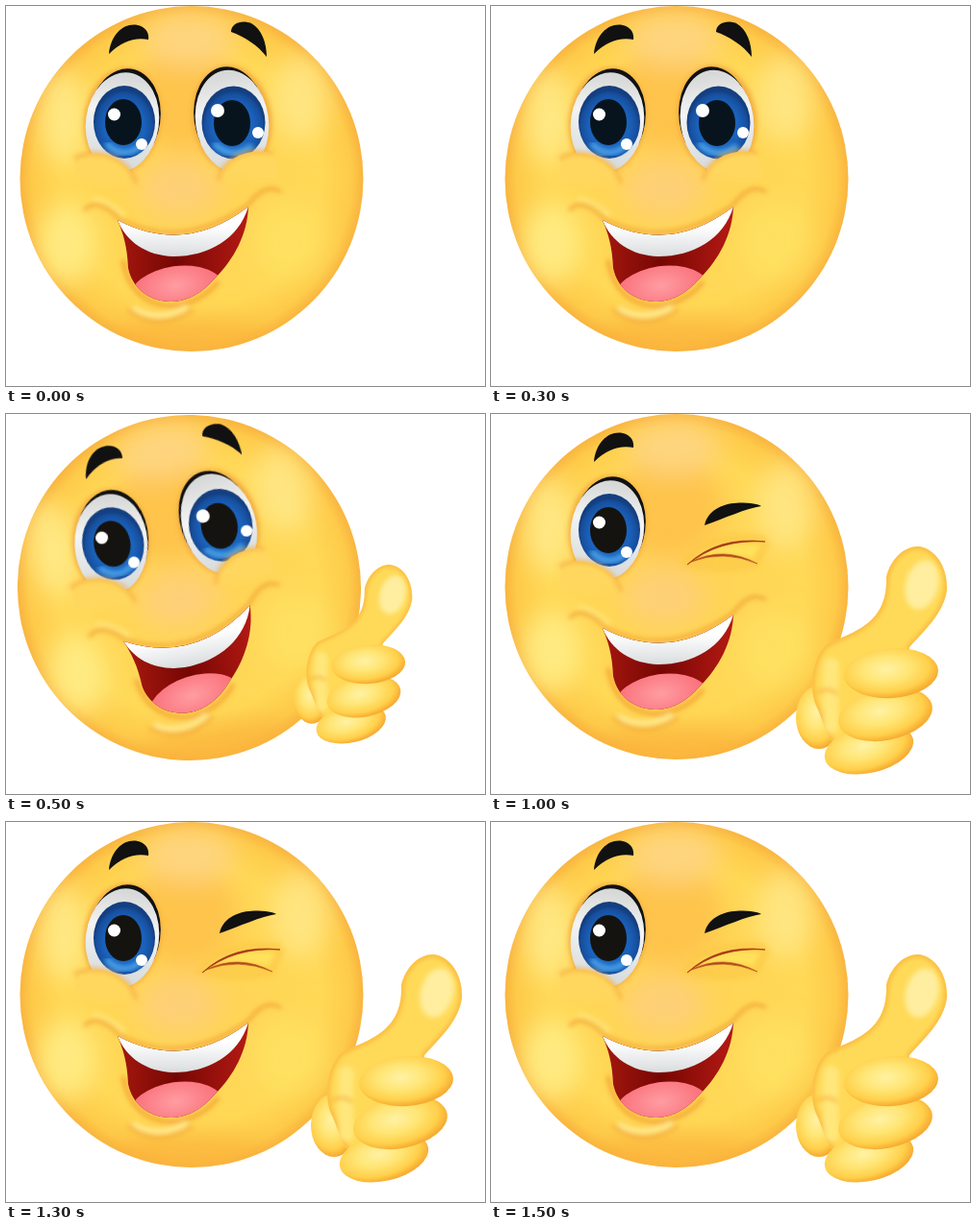
An HTML page for the animation above (2000 ms loop, 498 by 396 pixels).

```html
<!DOCTYPE html>
<html lang="en">
<head>
<meta charset="utf-8">
<title>Winking smiley</title>
<style>
  html, body { margin: 0; width: 100%; height: 100%; overflow: hidden; background: #fff; }
  svg { display: block; width: 498px; height: 396px; }
  .soft { filter: url(#blur); }
  .softer { filter: url(#wideBlur); }
  .line { fill: none; stroke-linecap: round; }
</style>
</head>
<body>
<svg viewBox="0 0 498 396">
  <defs>
    <filter id="blur" x="-30%" y="-30%" width="160%" height="160%"><feGaussianBlur stdDeviation="2.5"/></filter>
    <filter id="wideBlur" x="-60%" y="-60%" width="220%" height="220%"><feGaussianBlur stdDeviation="13"/></filter>
    <radialGradient id="skin">
      <stop offset="0" stop-color="#ffd356"/>
      <stop offset=".75" stop-color="#ffd957"/>
      <stop offset=".93" stop-color="#fecb4a"/>
      <stop offset="1" stop-color="#f9b53f"/>
    </radialGradient>
    <radialGradient id="finger" cx=".45" cy=".42" r=".57">
      <stop offset="0" stop-color="#fff2a4"/>
      <stop offset=".45" stop-color="#ffe574"/>
      <stop offset=".8" stop-color="#ffd04b"/>
      <stop offset="1" stop-color="#f7ac32"/>
    </radialGradient>
    <linearGradient id="cheek" x2="0" y2="1">
      <stop offset="0" stop-color="#ffd75e"/>
      <stop offset=".55" stop-color="#ffd75e"/>
      <stop offset="1" stop-color="#ffd75e" stop-opacity="0"/>
    </linearGradient>
    <linearGradient id="white" x2="0" y2="1">
      <stop offset="0" stop-color="#d4d6d5"/>
      <stop offset=".4" stop-color="#f3f4f3"/>
      <stop offset="1" stop-color="#d3d8da"/>
    </linearGradient>
    <radialGradient id="iris" cy=".56">
      <stop offset="0" stop-color="#1a66c0"/>
      <stop offset=".65" stop-color="#1a62bb"/>
      <stop offset=".9" stop-color="#174f9f"/>
      <stop offset="1" stop-color="#143f80"/>
    </radialGradient>
    <linearGradient id="throat" x2="1">
      <stop offset="0" stop-color="#a5180f"/>
      <stop offset=".45" stop-color="#760603"/>
      <stop offset="1" stop-color="#b51a14"/>
    </linearGradient>
    <linearGradient id="teeth" x2="0" y2="1">
      <stop offset=".4" stop-color="#fff"/>
      <stop offset="1" stop-color="#d9dcde"/>
    </linearGradient>
    <radialGradient id="tongue" cy=".35">
      <stop offset="0" stop-color="#ff9da2"/>
      <stop offset="1" stop-color="#f96c77"/>
    </radialGradient>
    <clipPath id="headClip"><ellipse cx="193" cy="180" rx="178.5" ry="180"/></clipPath>
    <clipPath id="mouthClip"><path id="mouthShape" d="M116 223Q186 260 252 209C251 238 237 264 217 284C203 300 188 308 171 308C149 308 131 294 127 273C126 250 122 238 116 223Z"/></clipPath>
    <clipPath id="palmClip"><path id="palm" d="M411 170C416 150 430 138 444 138C463 140 475 161 474 183C471 207 452 224 435 243L426 330L368 348C348 345 347 321 338 304C330 285 334 255 348 241C370 228 413 223 411 170Z"/></clipPath>
  </defs>

  <g id="head">
    <ellipse cx="193" cy="180" rx="178.5" ry="180" fill="url(#skin)"/>
    <g clip-path="url(#headClip)">
      <g class="softer">
        <ellipse cx="185" cy="95" rx="55" ry="55" fill="#fdbb48" opacity=".65"/>
        <ellipse cx="190" cy="35" rx="48" ry="28" fill="#fed584" opacity=".9"/>
        <ellipse cx="180" cy="190" rx="42" ry="30" fill="#fed07a" opacity=".9"/>
        <ellipse cx="190" cy="345" rx="85" ry="18" fill="#fbb03a" opacity=".75"/>
        <ellipse cx="60" cy="115" rx="25" ry="50" fill="#ffec8c" opacity=".85"/>
        <ellipse cx="306" cy="96" rx="30" ry="46" fill="#ffe98c" opacity=".8"/>
        <ellipse cx="63" cy="248" rx="30" ry="42" fill="#ffee88" opacity=".9"/>
        <ellipse cx="295" cy="245" rx="40" ry="42" fill="#ffe366" opacity=".7"/>
      </g>
      <g class="soft line">
        <path d="M82 212Q96 199 118 222Q184 256 252 207Q269 184 285 193" stroke="#f0a033" stroke-width="3"/>
        <path d="M92 201Q104 202 122 217" stroke="#ffe374" stroke-width="5"/>
        <path d="M122 266Q129 309 171 313Q202 310 220 288" stroke="#f3a233" stroke-width="4"/>
        <path d="M134 316Q159 329 186 315" stroke="#ffe887" stroke-width="7"/>
        <path d="M128 317Q158 340 193 317" stroke="#f2a52f" stroke-width="3"/>
      </g>
    </g>

    <path d="M107 50C109 29 123 17 137 20C146 22 149 29 148 35Q126 31 107 50Z" fill="#111"/>
    <g>
      <ellipse class="soft" cx="121" cy="119" rx="40" ry="55" fill="#f3aa3c" transform="rotate(8 121 119)"/>
      <ellipse cx="123" cy="117" rx="37.5" ry="52" fill="#111" transform="rotate(8 123 117)"/>
      <ellipse cx="121" cy="121" rx="38" ry="52" fill="url(#white)" transform="rotate(8 121 121)"/>
      <ellipse cx="123" cy="121" rx="32" ry="38" fill="url(#iris)"/>
      <path class="line soft" d="M106 145Q122 160 140 146" stroke="#4ba4ee" stroke-width="6"/>
      <ellipse class="pupil" cx="122" cy="121" rx="19" ry="24"/>
      <circle cx="112.500" cy="113" r="6.500" fill="#fff"/>
      <circle cx="141" cy="144" r="6" fill="#fff"/>
      <path d="M72 158C92 147 126 156 135 184Q105 205 72 185Z" fill="url(#cheek)"/>
      <path class="line soft" d="M72 158C92 147 126 156 135 184" stroke="#f5ad40" stroke-width="3"/>
    </g>

    <g id="openEye">
      <path d="M234 27C234 18 245 14 255 18C266 24 271 39 271 53C262 41 248 32 234 27Z" fill="#111"/>
      <ellipse class="soft" cx="235" cy="118" rx="41" ry="56" fill="#f3aa3c" transform="rotate(-8 235 118)"/>
      <ellipse cx="233" cy="116" rx="37.5" ry="53" fill="#111" transform="rotate(-8 233 116)"/>
      <ellipse cx="235" cy="120" rx="38" ry="53.5" fill="url(#white)" transform="rotate(-8 235 120)"/>
      <ellipse cx="236.500" cy="121.500" rx="33" ry="38" fill="url(#iris)"/>
      <path class="line soft" d="M218 145Q234 160 254 147" stroke="#4ba4ee" stroke-width="6"/>
      <ellipse class="pupil" cx="235" cy="122" rx="19" ry="24"/>
      <circle cx="220" cy="109" r="7" fill="#fff"/>
      <circle cx="262" cy="132" r="6" fill="#fff"/>
      <path d="M221 180C228 156 254 148 276 153L284 178Q254 202 221 180Z" fill="url(#cheek)"/>
      <path class="line soft" d="M221 180C228 156 254 148 276 153" stroke="#f5ad40" stroke-width="3"/>
    </g>

    <g id="wink">
      <path d="M222 116C226 98 244 93 258 92.500C270 92.500 278 94 281 96C266 98 242 109 222 116Z" fill="#111"/>
      <g class="soft">
        <path d="M196 158Q220 118 285 126L290 136L278 160Q236 170 196 158Z" fill="#fcc847" opacity=".6"/>
        <path d="M212 148Q240 132 280 136L273 150Q240 142 212 148Z" fill="#ffe15c"/>
      </g>
      <path d="M204 157Q236 127 285 133Q237 130 204 157Z" fill="#a8381a" stroke="#a8381a" stroke-width=".8"/>
      <path d="M208 154Q242 137 277 156Q242 141 208 154Z" fill="#b04a1b" stroke="#b04a1b" stroke-width=".6"/>
    </g>

    <use href="#mouthShape" fill="url(#throat)"/>
    <g clip-path="url(#mouthClip)">
      <ellipse cx="178" cy="300" rx="50" ry="29" fill="url(#tongue)" transform="rotate(-8 178 300)"/>
      <path d="M116 223Q186 260 252 209C242 243 210 261 174 261C146 260 125 246 116 223Z" fill="url(#teeth)"/>
    </g>
  </g>

  <g id="hand">
    <ellipse cx="341" cy="316" rx="24" ry="33" fill="url(#finger)"/>
    <use href="#palm" fill="#ffda58"/>
    <g clip-path="url(#palmClip)">
      <g class="soft line">
        <use href="#palm" stroke="#fab63c" stroke-width="5"/>
        <path d="M354 262Q352 285 354 325" stroke="#ffe77c" stroke-width="16"/>
        <path d="M340 290Q350 284 359 291" stroke="#f8b439" stroke-width="3"/>
      </g>
      <ellipse class="soft" cx="448" cy="178" rx="17" ry="26" fill="#ffee9f" transform="rotate(15 448 178)"/>
    </g>
    <ellipse cx="393" cy="349" rx="47" ry="25" fill="url(#finger)" transform="rotate(-13 393 349)"/>
    <ellipse cx="410" cy="313" rx="49.5" ry="27" fill="url(#finger)" transform="rotate(-11 410 313)"/>
    <ellipse cx="416" cy="270" rx="49" ry="26" fill="url(#finger)" transform="rotate(-4 416 270)"/>
  </g>
</svg>
<script>
const STEP = 500;
const TILT = "translate(-2.5 1) rotate(-10 193 180)";
const SMALL_HAND = "translate(50.2 48.7) scale(.785)";
const POSES = [
  { pupil: "#08141d" },
  { pupil: "#15130f", head: TILT, hand: SMALL_HAND },
  { pupil: "#15130f", hand: "scale(1)", wink: true },
  { pupil: "#15130f", hand: "scale(1)", wink: true },
];
const el = id => document.getElementById(id);
const show = (id, on) => el(id).setAttribute("display", on ? "inline" : "none");
const pupils = document.querySelectorAll(".pupil");

function draw(time) {
  const pose = POSES[Math.floor(time / STEP) % POSES.length];
  el("head").setAttribute("transform", pose.head || "");
  el("hand").setAttribute("transform", pose.hand || "");
  show("hand", pose.hand);
  show("wink", pose.wink);
  show("openEye", !pose.wink);
  pupils.forEach(p => p.setAttribute("fill", pose.pupil));
}

const start = performance.now();
function tick() {
  draw(performance.now() - start);
  requestAnimationFrame(tick);
}
tick();
</script>
</body>
</html>
```
